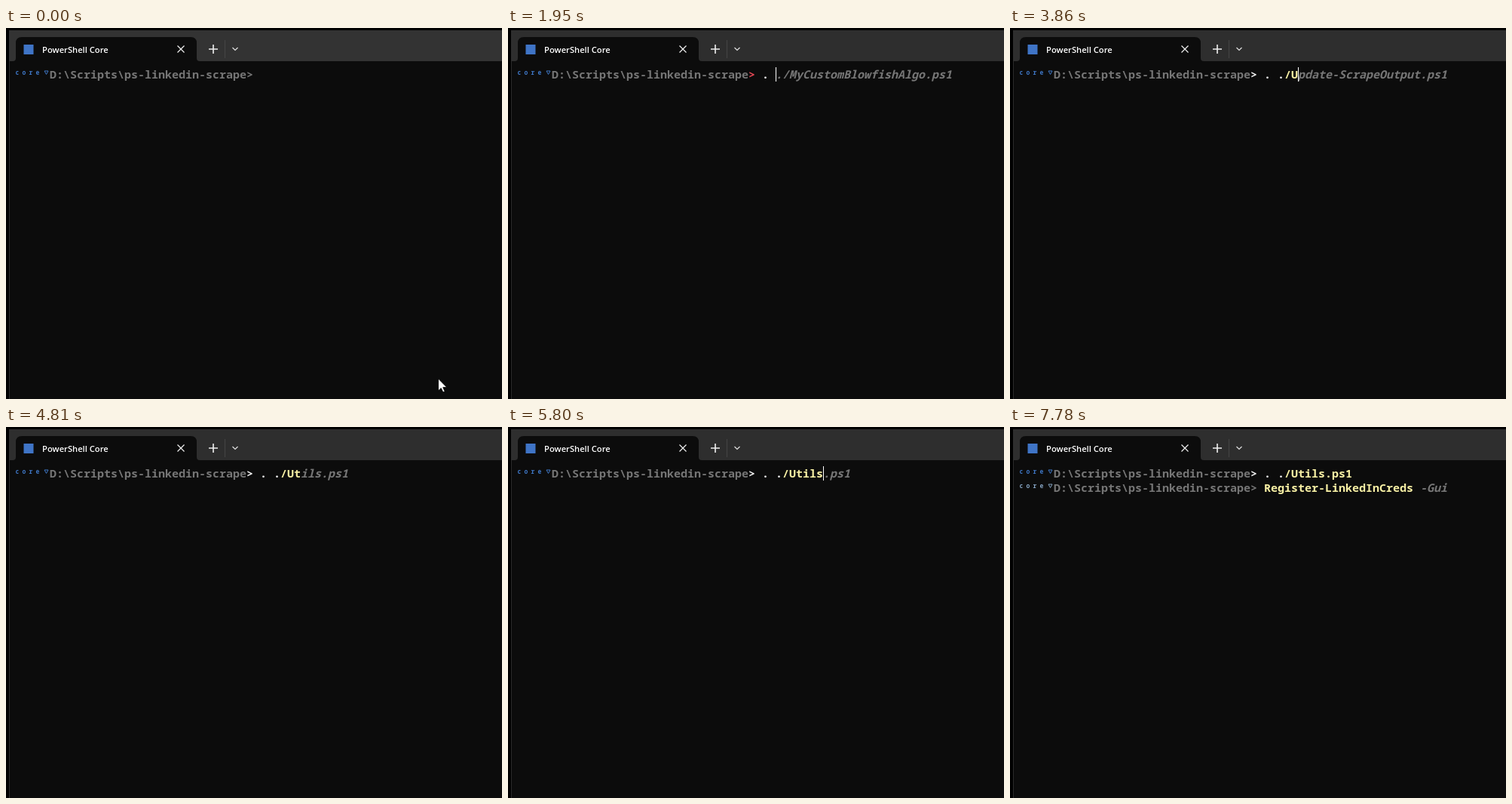
Write an HTML page with a canvas that moves like this. It is 658 by 492 pixels and loops after 7.99 s.

```html
<!DOCTYPE html>
<html lang="en">
<head>
<meta charset="utf-8">
<title>Terminal</title>
<style>
html, body { margin: 0; width: 100%; height: 100%; overflow: hidden; background: #0c0c0c; }
canvas { display: block; }
</style>
</head>
<body>
<canvas id="stage" width="658" height="492"></canvas>
<script>
const ctx = document.getElementById('stage').getContext('2d');
const LOOP = 7990, CELL = 9, INPUT_X = 337, ROW_HEIGHT = 19;
const MONO = '"Noto Sans Mono", monospace';
const GREY = '#767676', WHITE = '#f2f2f2', YELLOW = '#f9f1a5', RED = '#e74856', BACK = '#0c0c0c';
const PATH = 'D:\\Scripts\\ps-linkedin-scrape';

// Predictions come from the first entry that begins with the typed text.
const HISTORY = [
  '. ./MyCustomBlowfishAlgo.ps1', '. ./Update-ScrapeOutput.ps1',
  '. ./Utils.ps1', 'Register-LinkedInCreds -Gui'
];
const BURSTS = [
  { at: 430, keys: '.' },
  { at: 1505, keys: ' ' },
  { at: 2170, keys: './', gap: 110 },
  { at: 3560, keys: 'U' },
  { at: 4810, keys: 't' },
  { at: 5650, keys: 'ils', gap: 75 },
  { at: 6090, keys: '.ps1', gap: 140 },
  { at: 6800, keys: '\n' },
  { at: 7260, keys: 'R' },
  { at: 7470, keys: 'egister-LinkedInCreds' }
];
const BLINKS = [0, 1060, 1730, 2680, 4080, 4810, 5140, 6650, 7780], BLINK_TIME = 220;

function typedAt(t) {
  return BURSTS.map(({ at, keys, gap = 0 }) =>
    [...keys].filter((_, i) => t >= at + i * gap).join('')).join('');
}

function rect(color, x, y, w, h) {
  ctx.fillStyle = color;
  ctx.fillRect(x, y, w, h);
}

function text(str, x, y, color, font = '600 15px ' + MONO) {
  ctx.font = font;
  ctx.fillStyle = color;
  ctx.fillText(str, x, y);
}

function stroke(path, color, width = 1.2) {
  ctx.strokeStyle = color;
  ctx.lineWidth = width;
  ctx.stroke(new Path2D(path));
}

function drawWindow(bar) {
  rect('#000', 0, 0, 658, 492);
  rect(BACK, 5, 43, 653, 449);
  rect('#2a2a2a', 4, 43, 1, 449);
  rect(bar, 4, 3, 654, 41);
  ctx.fillStyle = BACK;
  ctx.fill(new Path2D('M9 44Q13 44 13 40V20Q13 12 21 12H245Q253 12 253 20V40Q253 44 257 44Z'));
  rect('#3f74c6', 23.5, 22, 13, 13);
  text('PowerShell Core', 48, 33, '#fff', '600 11.2px "Open Sans", sans-serif');
  stroke('M227.5 23.5L236.5 32.5M236.5 23.5L227.5 32.5', '#f0f0f0');
  stroke('M269 28H281M275 22V34', '#f0f0f0', 1.6);
  stroke('M290.5 16V40', '#454545', 1);
  stroke('M300.5 26L304 29.5L307.5 26', '#e0e0e0');
}

function drawPrompt(y, markColor, arrowColor) {
  [...'core'].forEach((c, i) => text(c, 12.6 + CELL * i, y - 5, markColor, 'bold 8px ' + MONO));
  stroke(`M51 ${y - 10}H56L53.5 ${y - 5.5}Z`, markColor, 1);
  text(PATH, 58, y, GREY);
  text('>', INPUT_X - 2 * CELL, y, arrowColor);
}

function arrowColor(line) {
  if (!line.startsWith('.')) return GREY;
  return line.trim() === '.' ? RED : WHITE;
}

function drawLine(line, row, caret) {
  const y = 67 + row * ROW_HEIGHT;
  const end = INPUT_X + CELL * line.length;
  const hint = line && HISTORY.find(entry => entry.startsWith(line));
  drawPrompt(y, row ? '#86a5c4' : '#3f78c8', arrowColor(line));
  // The dot operator and the path's first dot stay plain.
  const plain = line.match(/^[. ]*/)[0];
  text(plain, INPUT_X, y, WHITE);
  text(line.slice(plain.length), INPUT_X + CELL * plain.length, y, YELLOW);
  text(hint.slice(line.length), end, y, GREY, `italic 600 15px ${MONO}`);
  if (caret) rect('#fff', end, y - 15, 1, ROW_HEIGHT);
}

function drawMouse() {
  const arrow = 'M573.5 465V481L577.2 477.6L579.8 483L582.2 482L579.7 476.6H584.8Z';
  ctx.fillStyle = '#fff';
  ctx.fill(new Path2D(arrow));
  stroke(arrow, '#000', 0.8);
}

function draw(t) {
  const lines = typedAt(t).split('\n');
  const caretOn = !BLINKS.some(start => t >= start && t < start + BLINK_TIME);
  drawWindow(t < 100 ? '#333333' : '#2e2e2e');
  lines.forEach((line, row) => drawLine(line, row, caretOn && row === lines.length - 1));
  if (t < 265) drawMouse();
}

function tick() {
  draw(performance.now() % LOOP);
  requestAnimationFrame(tick);
}
tick();
</script>
</body>
</html>
```
